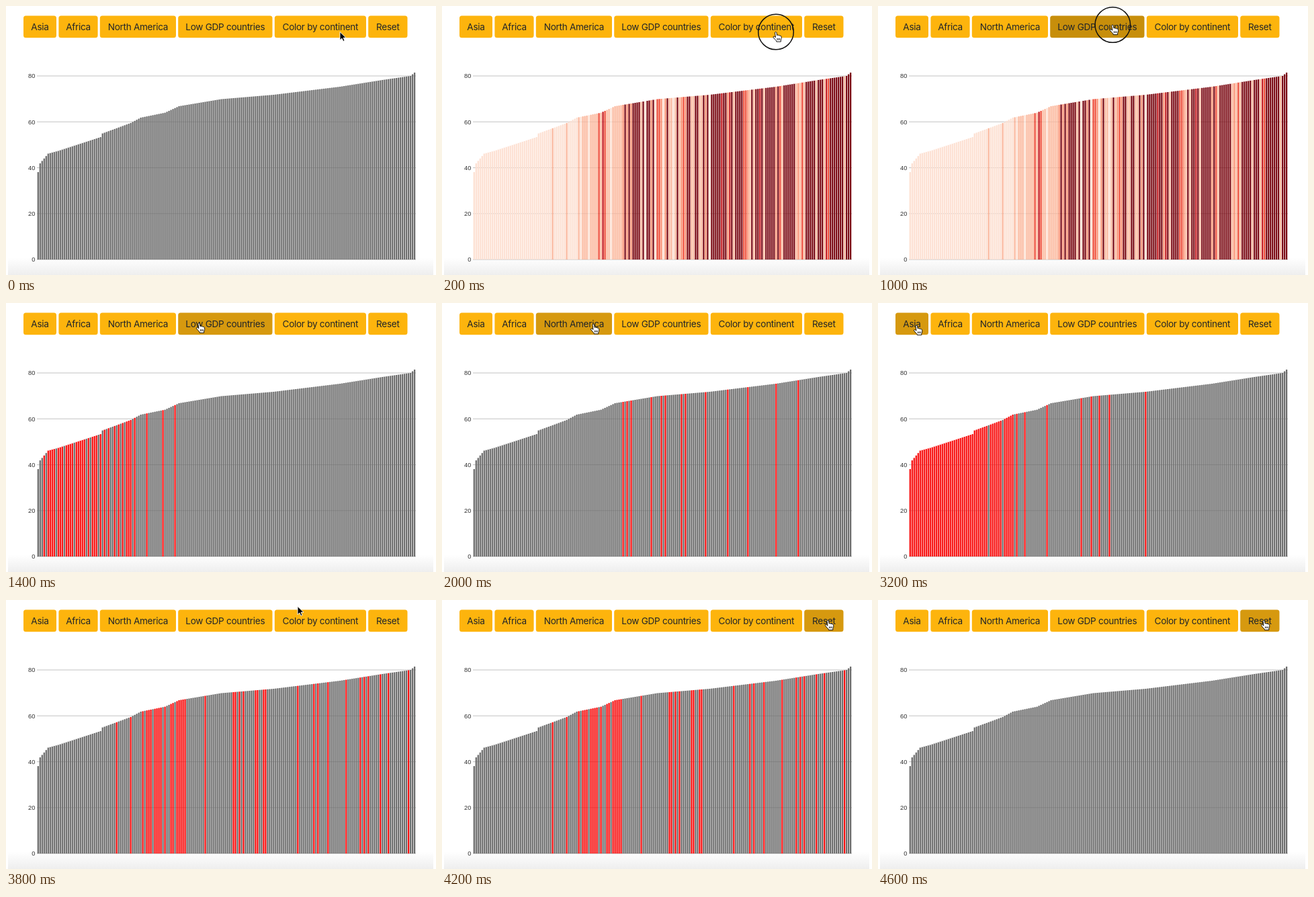
Animation of 640 by 400 pixels, one loop 4.8 s. Source, as an HTML page:

```html
<!DOCTYPE html>
<html lang="en">
<head>
<meta charset="utf-8">
<title>Life expectancy bars</title>
<style>
  html, body { margin: 0; width: 100%; height: 100%; overflow: hidden; background: #fff; }
  svg { display: block; width: 640px; height: 400px; }
  .label { font: 13.6px Inter, Roboto, sans-serif; letter-spacing: -0.3px; fill: #212529; text-anchor: middle; }
  .tick { font: 9.4px "Liberation Sans", sans-serif; fill: #333; text-anchor: end; }
</style>
</head>
<body>
<svg id="stage" viewBox="0 0 640 400">
  <defs>
    <linearGradient id="fade" x1="0" y1="0" x2="0" y2="1">
      <stop offset="0" stop-color="#fff"/>
      <stop offset="1" stop-color="#eeeeee"/>
    </linearGradient>
  </defs>
  <rect width="640" height="400" fill="#fff"/>
  <rect x="3" y="374" width="633" height="26" fill="url(#fade)"/>
  <g id="grid"></g>
  <g id="bars"></g>
  <g id="buttons"></g>
  <circle id="ring" r="26.3" fill="none" stroke="#111" stroke-width="1.5"/>
  <path id="arrow" d="M0 0V12.2L2.9 9.6L4.9 14L7 13.1L5.1 8.8H9Z" fill="#000" stroke="#fff" stroke-width=".9" stroke-linejoin="round"/>
  <path id="hand" d="M-1.5 1.2C-1.4-.3 .7-.3 1 1.2L1.7 5.2C2.2 4.2 3.8 4.4 4 5.5C4.6 4.8 5.9 5 6.1 6.1C7 5.5 8 6 8.1 7.1C8.5 9.2 8.2 11 7.3 12.4V14.6H.8V13.4C-1 12-2.3 10.2-3.7 8.5C-4.7 7.1-3.1 6.1-1.9 7.1L-.5 8.2ZM2 9.5V12.2M3.9 9.5V12.2M5.8 9.5V12.2" fill="#fff" stroke="#000" stroke-width=".9" stroke-linejoin="round"/>
</svg>
<script>
const STEP = 200, LOOP = 4800;
const COUNT = 188, LEFT = 46.1, RIGHT = 610, BASE = 377, UNIT = 3.4125;
const GREY = "#6c6c6c", RED = "#f80d0d";
const IDLE = "#fdb40d", HOVER = "#d6990f", ACTIVE = "#c78e0b";
const continentColors = {
  africa: "#fde0d2", asia: "#fbb79c", america: "#fa9172",
  oceania: "#ee4a35", south: "#c4171c", europe: "#7a0812"
};

const $ = id => document.getElementById(id);

function add(parent, tag, attrs, text) {
  const node = document.createElementNS("http://www.w3.org/2000/svg", tag);
  for (const key in attrs) node.setAttribute(key, attrs[key]);
  if (text !== undefined) node.textContent = text;
  return parent.appendChild(node);
}

function show(id, visible) {
  $(id).setAttribute("visibility", visible ? "visible" : "hidden");
}

let seed = 7;
function random() {
  seed = (seed * 1664525 + 1013904223) % 4294967296;
  return seed / 4294967296;
}

const bump = (i, center, width) => Math.exp(-(((i - center) / width) ** 2));

// How likely each continent is at a given rank
function weights(i) {
  return {
    africa: 80 * bump(i, 0, 25) + 0.1 * bump(i, 95, 35),
    asia: 0.3 + 2.2 * bump(i, 60, 10),
    america: 0.02 + 0.45 * bump(i, 98, 14) + 0.1 * bump(i, 130, 45),
    oceania: 0.07,
    south: 0.06,
    europe: (0.25 + 0.9 * i / COUNT) / (1 + Math.exp((72 - i) / 3))
  };
}

function pickContinent(i) {
  const entries = Object.entries(weights(i));
  let left = random() * entries.reduce((sum, [, w]) => sum + w, 0);
  return entries.find(([, w]) => (left -= w) < 0)[0];
}

// Key points of the sorted curve: [rank, y]
const curve = [
  [0, 247], [1, 234], [5, 219.5], [10, 215.5], [31, 195], [32, 189.5], [46, 174], [51, 166],
  [63, 158.7], [70, 149], [91, 138.5], [117, 132], [150, 120], [171, 110], [185, 104], [187, 99]
];

function topOf(i) {
  const next = Math.max(1, curve.findIndex(([rank]) => rank >= i));
  const [i0, y0] = curve[next - 1], [i1, y1] = curve[next];
  return y0 + (y1 - y0) * (i - i0) / (i1 - i0);
}

for (let value = 0; value <= 80; value += 20) {
  const y = BASE - value * UNIT;
  add($("grid"), "line", { x1: 46, x2: RIGHT, y1: y, y2: y, stroke: "#c2c2c2", "stroke-width": 1.1 });
  add($("grid"), "text", { x: 43.4, y: y + 3.4, class: "tick" }, value);
}

// Band layout with a gap of 0.2 between the bars and at both ends
const GAP = 0.2;
const pitch = (RIGHT - LEFT) / (COUNT + GAP);
const bars = Array.from({ length: COUNT }, (_, i) => {
  const y = topOf(i);
  const attrs = { x: LEFT + (i + GAP) * pitch, y, width: 2.25, height: BASE - y };
  return {
    rect: add($("bars"), "rect", attrs),
    continent: pickContinent(i),
    lowGdp: random() < 0.85 * Math.exp(-((i / 50) ** 3))
  };
});

const buttons = [
  ["Asia", 26, 75], ["Africa", 78.4, 136.6], ["North America", 139.8, 253],
  ["Low GDP countries", 256.2, 396.5], ["Color by continent", 399.8, 536], ["Reset", 539.2, 597.5]
].map(([name, left, right]) => {
  const rect = add($("buttons"), "rect", { x: left, y: 14.5, width: right - left, height: 32.8, rx: 3.6 });
  add($("buttons"), "text", { x: (left + right) / 2, y: 36.2, class: "label" }, name);
  return { rect, left, right };
});

// Pointer rests from step `from` to `to`; `view` applies from step `shown`
const stops = [
  { from: 0, to: 2, x: 497, y: 38.5, ring: 1, shown: 1, view: "continent" },
  { from: 5, to: 6, x: 349.3, y: 28, ring: 5, shown: 6, view: "lowGdp" },
  { from: 9, to: 10, x: 225.5, y: 31.3, ring: 9, shown: 10, view: "america" },
  { from: 13, to: 14, x: 108, y: 33, shown: 13, view: "africa" },
  { from: 16, to: 18, x: 57.5, y: 33, shown: 17, view: "asia" },
  { from: 19, to: 19, x: 434, y: 9.5 },
  { from: 21, to: 23, x: 574.5, y: 30, shown: 22, view: "none" }
];

function pointerAt(step) {
  const next = stops.findIndex(stop => step <= stop.to);
  const b = stops[next];
  if (step >= b.from) return b;
  const a = stops[next - 1];
  const ease = Math.sin((step - a.to) / (b.from - a.to) * Math.PI / 2);
  return { x: a.x + (b.x - a.x) * ease, y: a.y + (b.y - a.y) * ease };
}

function barColor(bar, view) {
  if (view === "continent") return continentColors[bar.continent];
  return bar.continent === view || (view === "lowGdp" && bar.lowGdp) ? RED : GREY;
}

const isArrow = step => step === 0 || step === 19;

function draw(time) {
  const step = Math.floor(time % LOOP / STEP);
  const { x, y } = pointerAt(step);
  const view = stops.reduce((current, stop) => step >= stop.shown ? stop.view : current, "none");
  const clicked = stops.some(stop => stop.ring === step);

  for (const bar of bars) bar.rect.setAttribute("fill", barColor(bar, view));

  // The tint follows one step after the pointer turns into a hand
  const tinted = step > 0 && !isArrow(step) && !isArrow(step - 1);
  for (const { rect, left, right } of buttons) {
    const over = tinted && x >= left && x <= right;
    rect.setAttribute("fill", over ? (clicked ? ACTIVE : HOVER) : IDLE);
  }

  for (const id of ["arrow", "hand", "ring"]) $(id).setAttribute("transform", `translate(${x} ${y})`);
  show("arrow", isArrow(step));
  show("hand", !isArrow(step));
  show("ring", clicked);
}

const start = performance.now();
function tick() {
  draw(performance.now() - start);
  requestAnimationFrame(tick);
}
tick();
</script>
</body>
</html>
```
